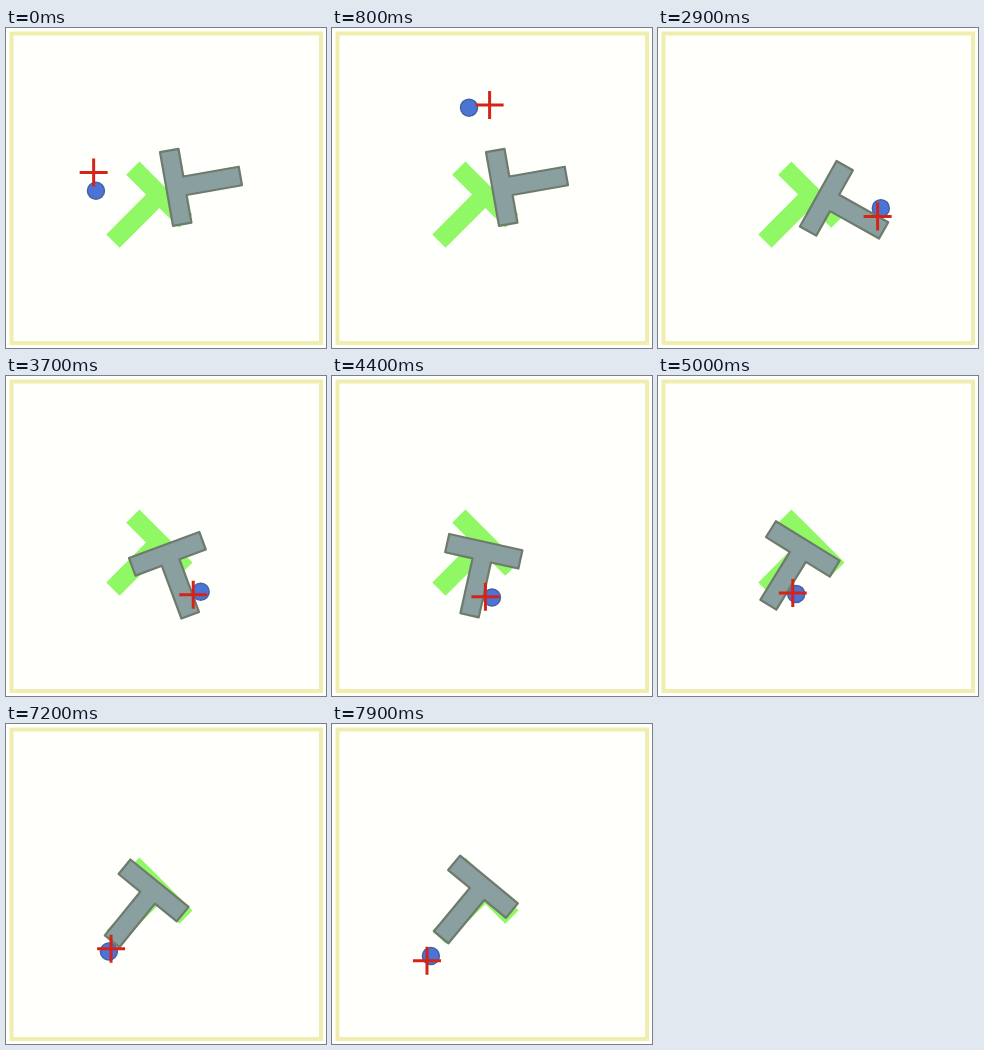
An HTML page that plays this animation: 320x320 px, repeating every 8000 ms.

```html
<!DOCTYPE html>
<html lang="en">
<head>
<meta charset="utf-8">
<title>Pushing a T block</title>
<style>
  html, body { margin: 0; width: 100%; height: 100%; overflow: hidden; background: #fffffc; }
  svg { display: block; width: 100vw; height: 100vh; }
</style>
</head>
<body>
<svg viewBox="0 0 320 320">
  <defs>
    <path id="tee" d="M-37.5 0H37.5V18.75H9.4V75H-9.4V18.75H-37.5Z"/>
  </defs>
  <rect width="320" height="320" fill="#fffffc"/>
  <rect x="5.5" y="5.5" width="309.5" height="309.5" fill="none" stroke="#efeeb0" stroke-width="4"/>
  <use href="#tee" transform="translate(160 160) rotate(45)" fill="#90f864"/>
  <circle id="agent" r="8.5" fill="#4c74d4" stroke="#4562a4" stroke-width="1.5"/>
  <use id="block" href="#tee" fill="#8a9f9f" stroke="#6d7a6c" stroke-width="2.2" stroke-linejoin="round"/>
  <path id="cross" d="M-14 0H14M0 -14V14" stroke="#d4241a" stroke-width="3"/>
</svg>
<script>
const LOOP = 8000, STEP = 100, LEAD = 150;
const { PI, sin, cos } = Math;

const progress = (t, from, to) => Math.min(1, Math.max(0, (t - from) / (to - from)));
const ease = (t, from, to) => (1 - cos(PI * progress(t, from, to))) / 2;

// The block turns while its stem is pushed sideways, then slides along the stem.
function blockAt(t) {
  const turn = ease(t, 1400, 5600), slide = ease(t, 6800, 7500);
  return {
    x: 160.5 - 12.5 * turn ** 3 + 9 * slide,
    y: 161 + 4 * turn + 6 * sin(PI * turn) ** 2 - 9.5 * slide,
    angle: -100 + 138.6 * turn + slide
  };
}

// The agent circles in, then moves in the block's own axes: along the stem,
// out around its end, back to push the end, and away.
function agentAt(t) {
  const block = blockAt(t), arrive = progress(t, 0, 1600);
  const across = 25 - 7 * ease(t, 1600, 2900) - 14 * ease(t, 6100, 6500);
  const along = 66 - 15 * ease(t, 1600, 5200) + 68 * ease(t, 5200, 6200)
    - 34 * ease(t, 6350, 6900) + 22 * ease(t, 7500, 8300);
  const a = (block.angle - 150.7 * (1 - arrive)) * PI / 180;
  const reach = 1 + 0.2 * sin(PI * arrive);
  return {
    x: block.x + reach * (across * cos(a) - along * sin(a)),
    y: block.y + reach * (across * sin(a) + along * cos(a))
  };
}

const place = (id, { x, y, angle = 0 }) =>
  document.getElementById(id).setAttribute('transform', `translate(${x} ${y}) rotate(${angle})`);

function draw(now) {
  const t = Math.floor(now % LOOP / STEP) * STEP;
  place('block', blockAt(t));
  place('agent', agentAt(t));
  place('cross', agentAt(t + LEAD)); // where the agent is heading
}

const start = performance.now();
function tick() {
  draw(performance.now() - start);
  requestAnimationFrame(tick);
}
tick();
</script>
</body>
</html>
```
